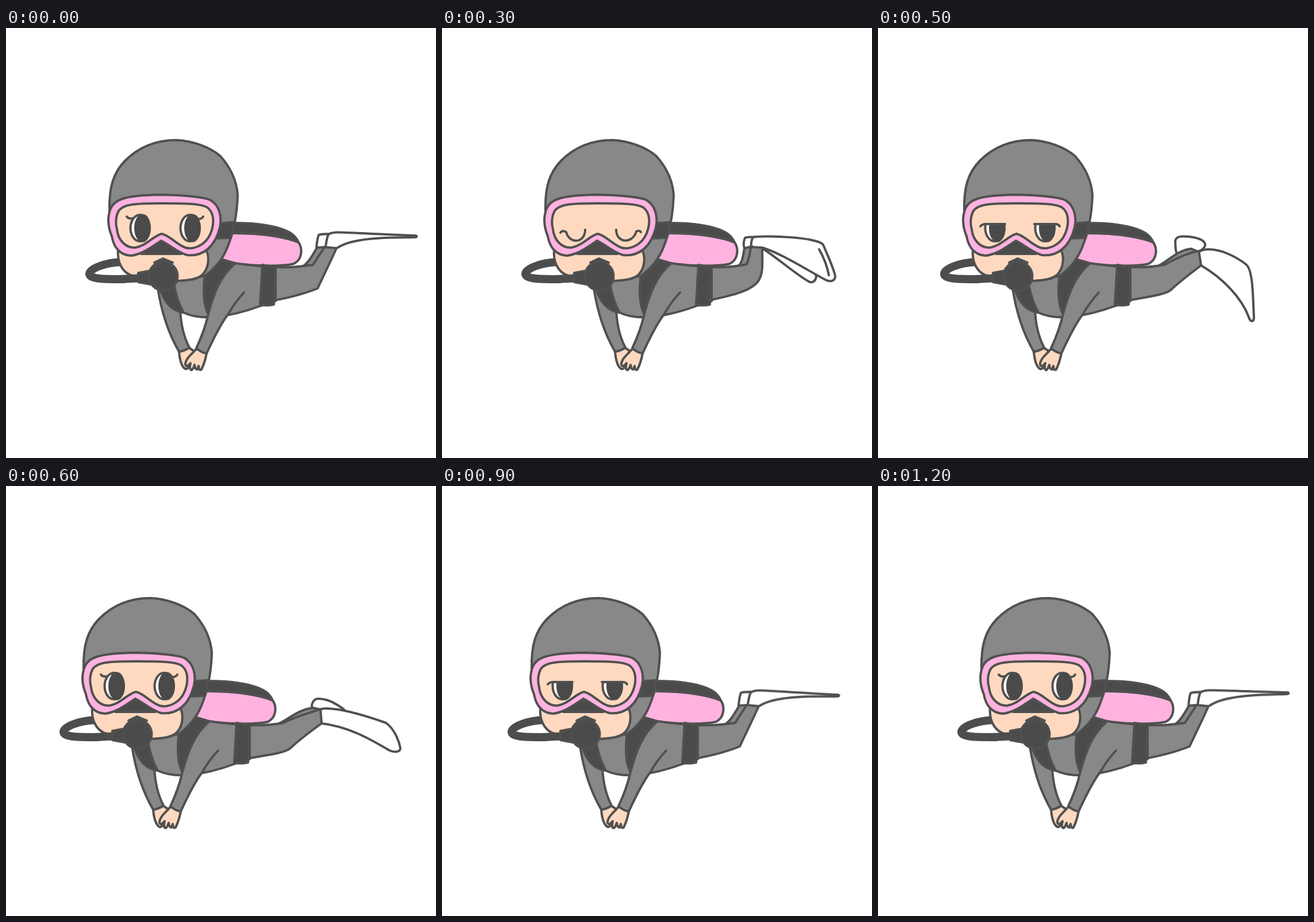
Recreate the animation shown at these times as an HTML page without scripts. Size 748x748 px, loop 1.3 s.

```html
<!DOCTYPE html>
<html lang="en">
<head>
<meta charset="utf-8">
<title>Diver</title>
<style>
  html, body { margin: 0; width: 100%; height: 100%; overflow: hidden; background: #fff; }
  svg { display: block; width: 100%; height: 100%; }
  path, ellipse { stroke: #505050; stroke-width: 4; stroke-linecap: round; stroke-linejoin: round; }
  .suit { fill: #888; }
  .skin { fill: #ffd9bf; }
  .pink { fill: #ffb2e0; }
  .dark { fill: #4b4b4b; }
  .white { fill: #fff; }
  .line { fill: none; }
  .hose { fill: none; stroke: #4d4d4d; stroke-width: 14; }
  .pupil { fill: #4a4a4a; stroke: none; }

  #diver, #diver * { animation-duration: 1300ms; animation-iteration-count: infinite; animation-timing-function: step-end; }
  #diver { animation-name: drift; }
  .leg { animation-name: leg; }
  .backLeg { animation-name: backLeg; }
  .fin { animation-name: fin; }
  .backFin { animation-name: backFin; }
  .fins { animation-name: sway; transform-origin: 565px 372px; }
  .crease { animation-name: crease; }
  .open { animation-name: open; }
  .half { animation-name: half; }
  .shut { animation-name: shut; }

  @keyframes drift {
    0% { transform: translateX(0); }
    23.07% { transform: translateX(0); animation-timing-function: steps(3); }
    46.15% { transform: translateX(-45px); }
    61.53% { transform: translateX(-36px); animation-timing-function: steps(3); }
    84.61%, 100% { transform: translateX(0); }
  }

  /* Each kick: stretched, folded, down, trailing */
  @keyframes leg {
    0%, 61.53%, 100% { d: path("M455 414C480 418 508 416 534 412C540 402 548 391 554 381L575 383C564 407 553 430 542 453C520 462 490 470 455 476Z"); animation-timing-function: steps(3); }
    23.07% { d: path("M455 414C480 418 506 416 530 411C534 402 536 391 537 381L557 382C557 408 560 430 548 443C532 461 490 468 455 476Z"); animation-timing-function: steps(2); }
    38.46% { d: path("M455 414C480 418 505 416 528 412C545 403 568 391 588 388L592 413C572 428 554 442 539 456C528 465 490 469 455 476Z"); }
    46.15% { d: path("M455 414C480 418 505 416 528 412C545 402 570 396 592 388L594 413C576 426 554 442 540 456C528 466 490 469 455 476Z"); animation-timing-function: steps(2); }
  }
  @keyframes backLeg {
    0%, 61.53%, 100% { d: path("M515 415C524 412 534 394 541 382L556 381L540 412Z"); animation-timing-function: steps(3); }
    23.07% { d: path("M512 415C522 414 524 395 526 383L540 380L536 412Z"); animation-timing-function: steps(2); }
    38.46% { d: path("M515 415C530 410 550 386 575 384L587 389L540 412Z"); }
    46.15% { d: path("M515 415C532 410 552 388 580 386L592 389L540 412Z"); animation-timing-function: steps(2); }
  }
  @keyframes fin {
    0%, 61.53%, 100% { d: path("M556 381C557 372 558 365 561 359C568 353 590 356 620 357C655 359 685 360 712 361C716 362 715 364 711 364C680 365 608 362 577 382"); animation-timing-function: steps(3); }
    23.07% { d: path("M537 381C538 375 538 368 541 364C562 360 655 364 663 377C672 398 684 424 684 433C683 441 674 442 667 438C630 418 590 392 557 382"); animation-timing-function: steps(2); }
    38.46% { d: path("M589 389C591 388 593 386 596 386C622 381 653 398 670 411C683 421 682 470 684 504C683 512 678 512 675 503C663 470 630 435 592 413"); }
    46.15% { d: path("M592 389C594 388 596 387 599 387C630 386 675 401 706 412C722 424 729 445 731 456C731 463 722 464 712 460C680 441 640 418 594 413"); animation-timing-function: steps(2); }
  }
  @keyframes backFin {
    0%, 61.53%, 100% { d: path("M540 382C541 374 541 367 544 360C550 356 590 360 630 360C650 361 690 362 700 362C700 363 690 363 680 363C630 364 590 365 556 381"); animation-timing-function: steps(3); }
    23.07% { d: path("M526 383C524 377 525 370 527 365C540 360 600 370 625 385C640 400 650 425 651 433C649 442 643 444 638 441C615 428 590 405 557 383"); animation-timing-function: steps(2); }
    38.46% { d: path("M550 396C548 388 547 378 547 371C548 361 560 362 572 363C588 365 600 370 599 378C598 384 592 386 588 389C575 396 560 398 550 396"); }
    46.15% { d: path("M578 387C575 380 580 370 588 370C600 370 612 375 620 380C625 383 630 386 634 390C625 395 615 395 608 394C600 395 585 392 578 387"); animation-timing-function: steps(2); }
  }
  @keyframes sway {
    0%, 61.53% { transform: rotate(0deg); }
    69.23% { transform: rotate(.8deg); }
    76.92% { transform: rotate(1.6deg); }
    84.61% { transform: rotate(.4deg); }
    92.3%, 100% { transform: rotate(-.8deg); }
  }
  @keyframes crease {
    0%, 30.76%, 100% { visibility: hidden; }
    23.07% { visibility: visible; }
  }
  @keyframes open {
    0%, 46.15%, 92.3%, 100% { visibility: visible; }
    15.38%, 69.23% { visibility: hidden; }
  }
  @keyframes half {
    0%, 23.07%, 46.15%, 76.92%, 92.3%, 100% { visibility: hidden; }
    15.38%, 38.46%, 69.23%, 84.61% { visibility: visible; }
  }
  @keyframes shut {
    0%, 38.46%, 84.61%, 100% { visibility: hidden; }
    23.07%, 76.92% { visibility: visible; }
  }
</style>
</head>
<body>
<svg viewBox="0 0 748 748">
  <defs>
    <clipPath id="lower"><path d="M200 341H350V380H200Z"/></clipPath>
    <g id="eye">
      <ellipse class="white" cx="233" cy="348" rx="16.5" ry="23"/>
      <ellipse class="pupil" cx="237.500" cy="348" rx="14.5" ry="24.5"/>
    </g>
    <g id="eyes">
      <use href="#eye"/>
      <use href="#eye" x="87"/>
    </g>
  </defs>
  <g id="diver">
    <!-- legs and fins -->
    <g class="fins">
      <path class="white backFin"/>
      <path class="white fin"/>
    </g>
    <path class="line crease" d="M656 385C664 399 670 414 673 430"/>
    <path class="suit backLeg"/>
    <path class="suit leg"/>

    <!-- tank -->
    <path class="pink" d="M370 357H400C450 357 490 365 509 373C516 383 516 402 501 410C480 416 430 413 400 411L365 402Z"/>
    <path class="dark" d="M380 340C430 337 474 344 494 356Q504 362 509 373C485 361 445 356 380 357Z"/>

    <!-- arms and body -->
    <path class="skin" d="M301 563C302 575 305 589 312 593Q317 594 319 586L327 562L318 556Z"/>
    <path class="suit" d="M264 452C270 492 283 532 301 563Q310 562 319 556C308 535 304 512 303 490L290 452Z"/>
    <path class="suit" d="M266 445C276 476 290 491 309 495C325 503 345 504 362 503C392 500 420 492 444 483L469 475V416C445 415 420 412 398 409L345 425Z"/>
    <path class="dark" d="M267 452C275 477 289 493 309 495C302 483 296 466 292 445Z"/>
    <path class="dark" d="M374 402L398 409C374 428 360 460 352 498C342 480 343 452 346 428Z"/>
    <path class="skin" d="M331 558C325 566 317 571 314 578Q310 586 314 588Q317 588 321 583Q318 595 323 595Q327 591 328 586Q329 594 333 594L335 588Q336 597 340 594C344 586 347 576 349 566Z"/>
    <path class="suit" style="stroke:none" d="M398 410C372 432 361 464 352 497C347 520 339 540 331 557Q340 565 349 566C361 540 373 515 387 497L414 460Z"/>
    <path class="line" d="M398 410C372 432 361 464 352 497C347 520 339 540 331 557Q340 565 349 566C361 540 373 515 387 497C394 484 404 471 414 460"/>
    <path class="dark" d="M446 412Q458 415 469 414L466 481Q453 484 442 481Z"/>

    <!-- head -->
    <path class="suit" d="M195 360L180 318C179 276 187 252 207 231C232 206 263 195 296 195C324 196 355 207 373 223C389 241 401 264 403 290C402 328 396 355 385 382C377 402 363 419 345 432L290 435Z"/>
    <path class="dark" d="M365 340L396 338Q396 352 391 365L365 366Z"/>
    <path class="hose" d="M203 407C168 408 145 420 145 428C146 436 162 437 205 437"/>
    <path class="skin" d="M195 385C193 407 202 424 217 430C245 438 268 440 290 440C318 440 339 437 345 425C352 416 354 399 349 388L270 345Z"/>

    <!-- mask -->
    <path class="dark" d="M235 393L270 366L305 393Z"/>
    <path class="pink" d="M180 320C185 297 208 291 270 290C315 291 342 294 355 299C371 308 376 328 372 347C364 379 344 398 315 395C300 391 287 379 270 370C255 380 237 394 217 396C197 395 187 380 184 362C177 345 177 331 180 320Z"/>
    <path class="skin" d="M195 320C202 306 225 305 272 305C320 305 339 306 350 312C362 321 363 339 356 357C347 379 325 386 312 382C297 377 285 361 271 358C257 361 244 379 225 382C208 383 195 369 193 350C190 340 191 328 195 320Z"/>

    <g class="open">
      <use href="#eyes"/>
      <path class="line" d="M210 328Q214 333 221 331M343 328Q340 333 334 332"/>
    </g>
    <g class="half">
      <use href="#eyes" clip-path="url(#lower)"/>
      <path class="line" d="M208 345Q211 341 218 341H251M302 341H338Q344 341 346 345"/>
    </g>
    <path class="line shut" d="M206 356Q209 351 216 355C222 377 249 374 249 351M303 351C303 374 331 377 338 354Q343 351 346 355"/>

    <!-- regulator -->
    <path class="hose" d="M195 437L240 435"/>
    <path class="dark" d="M230 426L252 422V446L230 442Z"/>
    <path class="dark" d="M258 408L273 401L290 408L284 412H263Z"/>
    <ellipse class="dark" cx="273.500" cy="431.500" rx="25" ry="25"/>
  </g>
</svg>
</body>
</html>
```
